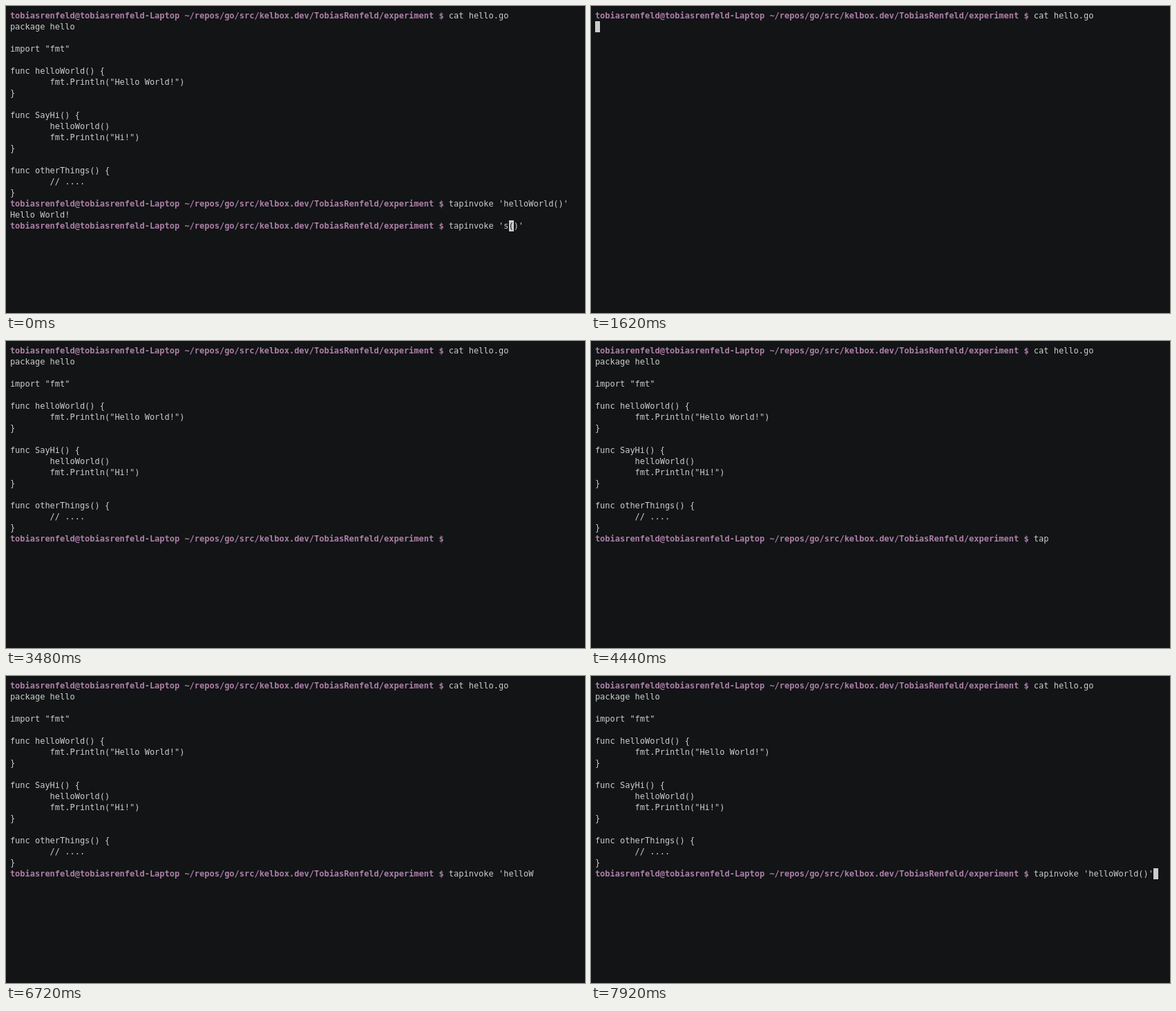
Recreate the animation shown at these times as an HTML page. Size 838x444 px, loop 8000 ms.

```html
<!DOCTYPE html>
<html lang="en">
<head>
<meta charset="utf-8">
<title>Terminal session</title>
<style>
  html, body { margin: 0; width: 100%; height: 100%; overflow: hidden; background: #121416; }
  /* The size gives character cells of 7.21875px */
  pre {
    position: absolute; left: 5.89px; top: 6px; margin: 0;
    font: 11.9903px/16px "DejaVu Sans Mono", monospace; color: #cbcdca;
  }
  b { color: #ad7fa8; }
  mark { position: relative; left: .125px; padding: 1px 0; background: #cbcdca; color: #121416; }
</style>
</head>
<body>
<pre id="screen"></pre>
<script>
const LOOP = 8000, BLINK = 360, CLEAR = 120;
const PROMPT = 'tobiasrenfeld@tobiasrenfeld-Laptop ~/repos/go/src/kelbox.dev/TobiasRenfeld/experiment $ ';
const FILE = `package hello

import "fmt"

func helloWorld() {
        fmt.Println("Hello World!")
}

func SayHi() {
        helloWorld()
        fmt.Println("Hi!")
}

func otherThings() {
        // ....
}
`;
const SESSION = `${PROMPT}cat hello.go\n${FILE}${PROMPT}tapinvoke 'helloWorld()'\nHello World!\n${PROMPT}tapinvoke 's`;

// Output appears key by key; a burst is a run of keys at a steady pace
const keys = [];
const burst = (start, gap, ...run) =>
  run.forEach((text, i) => keys.push({ time: start + i * gap, text }));

burst(CLEAR, 0, PROMPT);
burst(780, 60, ...'ca');
burst(1020, 60, ...'t ');
burst(1260, 90, 'h', 'e', 'llo.go ');
burst(1620, 60, '\n', FILE + PROMPT);
burst(3900, 90, ...'tap');
burst(4560, 60, ...'in');
burst(4800, 660, 'voke ', "'");
burst(5760, 105, ...'hello');
burst(6360, 480, ...'Wo');
burst(7140, 90, ...'rld');
burst(7500, 120, ...'()');
burst(7920, 0, "'");

const cursor = cell => `<mark>${cell}</mark>`;

function render(time) {
  if (time < CLEAR) return SESSION + cursor('(') + ")'";
  const typed = keys.filter(key => key.time <= time);
  const idle = time - typed.at(-1).time;
  const lit = Math.floor(idle / BLINK) % 2 === 0;
  return typed.map(key => key.text).join('') + (lit ? cursor(' ') : '');
}

const screenEl = document.getElementById('screen');
let shown;

function tick() {
  const html = render(performance.now() % LOOP);
  if (html !== shown) {
    shown = html;
    screenEl.innerHTML = html.replaceAll(PROMPT, `<b>${PROMPT}</b>`);
  }
  requestAnimationFrame(tick);
}
tick();
</script>
</body>
</html>
```
